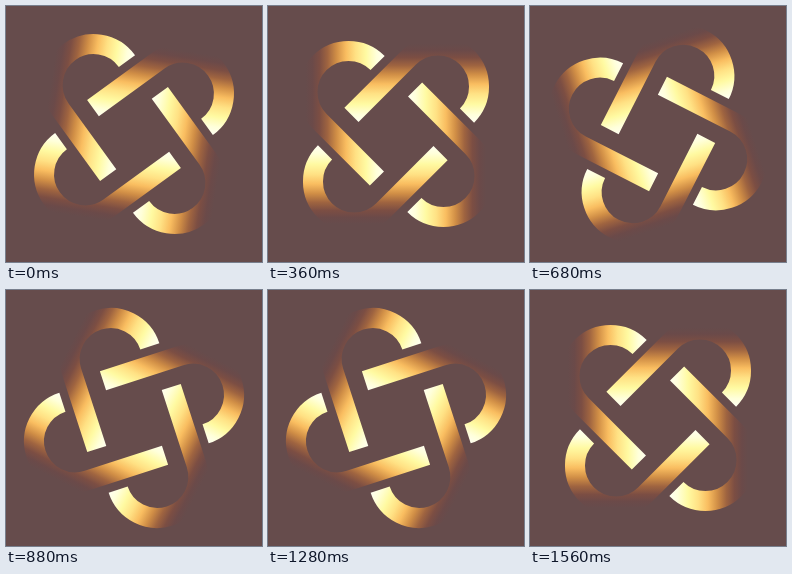
An HTML page for the animation above (1600 ms loop, 256 by 256 pixels).

```html
<!DOCTYPE html>
<html lang="en">
<head>
<meta charset="utf-8">
<title>Golden knot</title>
<style>
  html, body { margin: 0; width: 100%; height: 100%; overflow: hidden; background: #664c4c; }
  svg { display: block; width: 100vw; height: 100vh; }
</style>
</head>
<body>
<svg viewBox="0 0 256 256">
  <defs>
    <!-- runs diagonally, from both open ends towards the bend -->
    <linearGradient id="gold" gradientUnits="userSpaceOnUse" x1="7.07" y1="-7.07" x2="63.64" y2="-63.64">
      <stop offset="0" stop-color="#fffff6"/>
      <stop offset=".12" stop-color="#ffffda"/>
      <stop offset=".25" stop-color="#fffaa2"/>
      <stop offset=".38" stop-color="#ffe184"/>
      <stop offset=".5" stop-color="#f9bd60"/>
      <stop offset=".62" stop-color="#d08e46"/>
      <stop offset=".73" stop-color="#9f6440"/>
      <stop offset=".83" stop-color="#7c4e43"/>
      <stop offset=".92" stop-color="#6b4a49"/>
      <stop offset="1" stop-color="#664c4c"/>
    </linearGradient>
    <path id="hook" d="M-18-45H63.2A41.1 41.1 0 0 1 63.2 37.2" fill="none" stroke="url(#gold)" stroke-width="20"/>
  </defs>
  <rect width="256" height="256" fill="#664c4c"/>
  <g id="knot">
    <use href="#hook"/>
    <use href="#hook" transform="rotate(90)"/>
    <use href="#hook" transform="rotate(180)"/>
    <use href="#hook" transform="rotate(270)"/>
  </g>
</svg>
<script>
  const LOOP = 1600, STEP = 40, START = -36;
  const knot = document.getElementById('knot');

  function draw(time) {
    const tick = Math.floor((time % LOOP + 0.5) / STEP);
    const angle = START + tick * STEP / LOOP * 360;
    knot.setAttribute('transform', `translate(128 128) rotate(${angle})`);
  }

  function loop(now) {
    draw(now);
    requestAnimationFrame(loop);
  }

  draw(0);
  requestAnimationFrame(loop);
</script>
</body>
</html>
```
